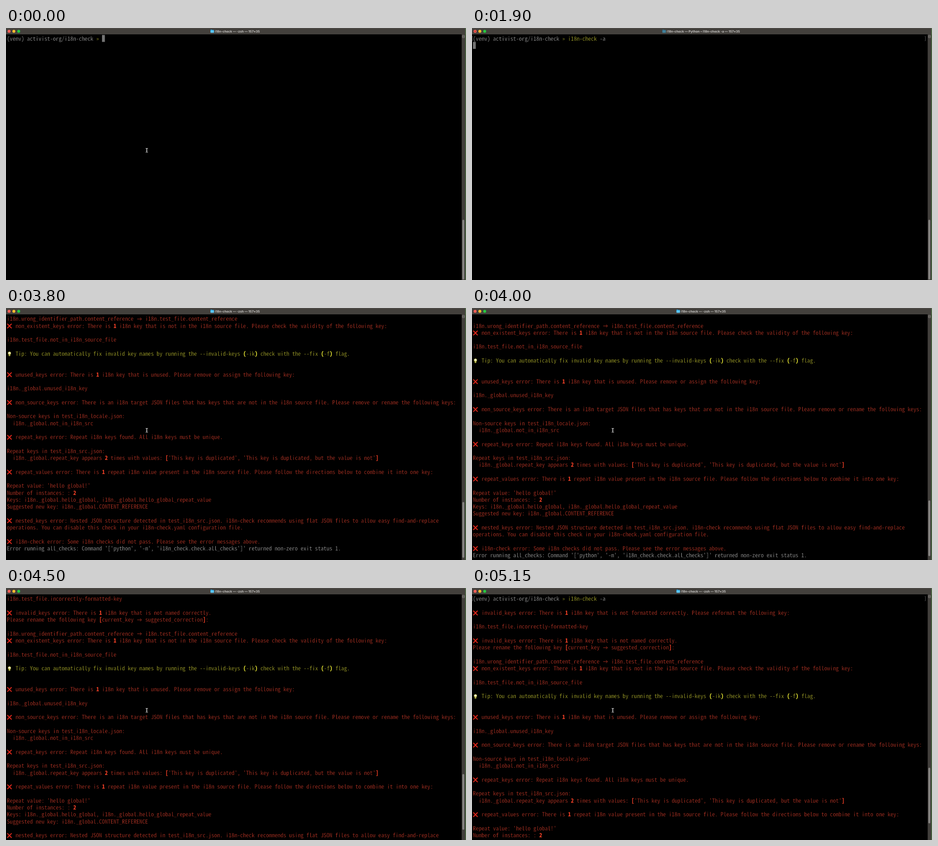
An HTML page for the animation above (5.31 s loop, 1011 px wide and 554 px high).

```html
<!DOCTYPE html>
<html lang="en">
<head>
<meta charset="utf-8">
<title>Terminal</title>
<style>
  html, body { margin: 0; width: 100%; height: 100%; overflow: hidden; background: #000; }
  svg { display: block; width: 1011px; height: 554px; }
  text { white-space: pre; text-rendering: geometricPrecision; font-variant-ligatures: none; }
  #screen text { font-family: "Noto Sans Mono CJK JP", "Noto Sans Mono CJK SC", "Noto Sans Mono", monospace; }
  #title text { font-family: Inter, sans-serif; font-weight: 700; fill: #c9c7c5; }
  .grey { fill: #a6a6a6; stroke: #a6a6a6; }
  .red { fill: #bd3727; stroke: #bd3727; }
  .yellow { fill: #b0b02d; stroke: #b0b02d; }
  .bold { font-weight: 700; }
  .red .bold { fill: #ff4328; }
  .yellow .bold { fill: #eeee35; }
  /* A black outline thins the regular weight. */
  #screen text { stroke: #000; stroke-width: 0.25px; }
  #screen .bold { stroke: none; }
</style>
</head>
<body>
<svg viewBox="0 0 1011 554">
  <rect width="1011" height="554"/>
  <rect width="1010" height="14" fill="#43403c"/>
  <rect width="1010" height="0.7" fill="#5b5854"/>
  <circle cx="6.8" cy="7.2" r="3.2" fill="#ff5f57"/>
  <circle id="busy" cx="6.8" cy="7.2" r="1.1" fill="#7d1510"/>
  <circle cx="17.3" cy="7.2" r="3.2" fill="#febc2e"/>
  <circle cx="27.9" cy="7.2" r="3.2" fill="#28c840"/>
  <g id="title"></g>
  <rect x="1001.5" y="14" width="8" height="540" fill="#423f3c"/>
  <path d="M1003.2 16.2h4.4v5h-4.4zM1003.2 18.7h4.4" fill="none" stroke="#96938f" stroke-width="0.8"/>
  <rect id="thumb" x="1003" width="4.2" rx="2.1" fill="#868482"/>
  <rect x="1009.5" width="1.5" height="554" fill="#55784a"/>
  <g id="screen"></g>
  <g id="pointer" fill="none">
    <defs><path id="beam" d="M307 264.6q2.4 0 2.4 1.6v5.4q0 1.6-2.4 1.6M311.8 264.6q-2.4 0-2.4 1.6v5.4q0 1.6 2.4 1.6M308 269h2.8"/></defs>
    <use href="#beam" stroke="#111" stroke-width="2.4"/>
    <use href="#beam" stroke="#d6d6d6" stroke-width="1.1"/>
  </g>
</svg>
<script>
const LOOP = 5310, LEFT = 2, TOP = 15.5, COL = 6.333, ROW = 15.29, ROWS = 35, BASELINE = 12.8;
const PROMPT = '(venv) activist-org/i18n-check ~»~ ';
const PROMPT_COLS = 33;
const TITLE_IDLE = 'i18n-check — -zsh — 157×35';
const TITLE_BUSY = 'i18n-check — Python • i18n-check -a — 157×35';

// Markup: leading x = cross, leading ? = bulb, *bold*, ~yellow~, ^red^
const OUTPUT = `
xinvalid_keys error: There is *1* i18n key that is not formatted correctly. Please reformat the following key:

i18n.test_file.incorrectly-formatted-key

xinvalid_keys error: There is *1* i18n key that is not named correctly.
Please rename the following key *[*current_key → suggested_correction*]*:

i18n.wrong_identifier_path.content_reference → i18n.test_file.content_reference
xnon_existent_keys error: There is *1* i18n key that is not in the i18n source file. Please check the validity of the following key:

i18n.test_file.not_in_i18n_source_file

?Tip: You can automatically fix invalid key names by running the --invalid-keys *(*-ik*)* check with the --fix *(*-f*)* flag.


xunused_keys error: There is *1* i18n key that is unused. Please remove or assign the following key:

i18n._global.unused_i18n_key

xnon_source_keys error: There is an i18n target JSON files that has keys that are not in the i18n source file. Please remove or rename the following keys:

Non-source keys in test_i18n_locale.json:
  i18n._global.not_in_i18n_src

xrepeat_keys error: Repeat i18n keys found. All i18n keys must be unique.

Repeat keys in test_i18n_src.json:
  i18n._global.repeat_key appears *2* times with values: *[*'This key is duplicated', 'This key is duplicated, but the value is not'*]*

xrepeat_values error: There is *1* repeat i18n value present in the i18n source file. Please follow the directions below to combine it into one key:

Repeat value: 'hello global!'
Number of instances: : *2*
Keys: i18n._global.hello_global, i18n._global.hello_global_repeat_value
Suggested new key: i18n._global.CONTENT_REFERENCE

xnested_keys error: Nested JSON structure detected in test_i18n_src.json. i18n-check recommends using flat JSON files to allow easy find-and-replace
operations. You can disable this check in your i18n-check.yaml configuration file.

xi18n-check error: Some i18n checks did not pass. Please see the error messages above.
Error running all_checks: Command '['python', '-m', 'i18n_check.check.all_checks']' returned non-zero exit status 1.
`.split('\n');

// [time, value] steps
const TYPED = [[0, ''], [200, '^i^'], [300, '^i1^'], [500, '^i18^'], [600, '^i18n^'], [800, '~i18n-check~ -a']];
const SCROLL = [[0, 0], [2200, 10], [3800, 9], [4000, 8], [4100, 7], [4300, 6], [4400, 5],
  [4500, 4], [4800, 3], [4900, 2], [5000, 1], [5150, 0]];

const byId = id => document.getElementById(id);
const stepAt = (steps, t) => steps.filter(([start]) => start <= t).pop()[1];
const escapeText = s => s.replace(/&/g, '&amp;').replace(/</g, '&lt;');
const show = (id, on) => byId(id).setAttribute('visibility', on ? 'visible' : 'hidden');

function fitSize(font, weight, sample, width) {
  const ctx = document.createElement('canvas').getContext('2d');
  ctx.font = `${weight} 100px ${font}`;
  return 100 * width / ctx.measureText(sample).width;
}
const MONO = '"Noto Sans Mono CJK JP", "Noto Sans Mono CJK SC", "Noto Sans Mono", monospace';
const monoSize = fitSize(MONO, 400, 'n'.repeat(50), 50 * COL);
const titleSize = fitSize('Inter, sans-serif', 700, TITLE_IDLE, 99);

const columnX = col => LEFT + col * COL;
const rowY = row => TOP + row * ROW;

function cross(y) {
  return `<path d="M3.4 ${y + 4.5}l8.4 8.6m0 -8.6l-8.4 8.6" stroke="#e3281c" stroke-width="2.1" stroke-linecap="round"/>`;
}

function bulb(y) {
  return `<circle cx="7.6" cy="${y + 7.3}" r="3" fill="#fbf6dc"/>
    <path d="M6 ${y + 9.1}h3.2v2h-3.2z" fill="#f1e6b8"/>
    <path d="M6.2 ${y + 11.1}h2.8v2.2h-2.8z" fill="#8f9399"/>`;
}

function arrow(col, y) {
  const x = columnX(col) + 1.3;
  return `<path d="M${x} ${y + 8.7}h9.6m-3.4 -3.2l3.4 3.2l-3.4 3.2" fill="none" stroke-width="0.9"/>`;
}

function textRow(source, row, tone) {
  const y = rowY(row), classes = { '*': 'bold', '~': 'yellow', '^': 'red' };
  let col = 0, out = '';
  if (/^[x?]/.test(source)) {
    out += source[0] === 'x' ? cross(y) : bulb(y);
    if (source[0] === '?') tone = 'yellow';
    source = source.slice(1);
    col = 3;
  }
  for (const part of source.split(/(\*[^*]+\*|~[^~]+~|\^[^^]+\^|→)/)) {
    if (!part) continue;
    if (part === '→') {
      out += arrow(col, y);
      col += 2;
      continue;
    }
    const cls = classes[part[0]];
    const body = cls ? part.slice(1, -1) : part;
    out += `<text class="${cls || ''}" x="${columnX(col)}" y="${y + BASELINE}">${escapeText(body)}</text>`;
    col += body.length;
  }
  return `<g class="${tone}">${out}</g>`;
}

function cursor(col, row) {
  return `<rect x="${columnX(col)}" y="${rowY(row) - 0.2}" width="${COL}" height="${ROW}" fill="#747474"/>`;
}

function marks(row) {
  const y = rowY(row) + 3;
  return `<path d="M2 ${y}h-1.3v9.5h1.3M995.2 ${y}h1.3v9.5h-1.3" fill="none" stroke="#666" stroke-width="0.8"/>`;
}

function titleMarkup(busy, dim) {
  const x = busy ? 428 : 459, fill = dim ? '#35718c' : '#2fa9e4', front = dim ? '#42819b' : '#5cc8f5';
  return `<path d="M${x - 9.5} 4q0 -.6 .6 -.6h2.2l.8 .8h3.4q.6 0 .6 .6v5h-7.6z" fill="${fill}"/>
    <rect x="${x - 9.5}" y="5.4" width="7.6" height="5" rx=".6" fill="${front}"/>
    <text x="${x}" y="9.7" font-size="${titleSize}">${busy ? TITLE_BUSY : TITLE_IDLE}</text>`;
}

function screenMarkup(t) {
  const typed = stepAt(TYPED, t), offset = stepAt(SCROLL, t);
  const entered = t >= 1500, printed = t >= 2200;
  const lines = [PROMPT + typed];
  if (printed) lines.push(...OUTPUT, PROMPT);

  let out = '';
  lines.slice(offset, offset + ROWS).forEach((line, row) => {
    const index = row + offset;
    const plain = index === 0 || index >= lines.length - 3;
    out += textRow(line, row, plain ? 'grey' : 'red');
  });
  if (entered && offset === 0) out += marks(0);

  const typedCols = typed.replace(/[~^]/g, '').length;
  if (!entered) out += cursor(PROMPT_COLS + typedCols, 0);
  else if (!printed) out += cursor(0, 1);
  else if (offset === 10) out += cursor(PROMPT_COLS, ROWS - 1);
  return out;
}

const CHANGES = [...new Set([...TYPED, ...SCROLL].map(([t]) => t).concat(1500, 1900, 2300, 3200))].sort((a, b) => a - b);
let drawn = -1;

function render(t) {
  const state = CHANGES.filter(c => c <= t).pop();
  if (state === drawn) return;
  drawn = state;
  byId('screen').innerHTML = screenMarkup(t);
  byId('title').innerHTML = titleMarkup(t >= 1900 && t < 2300, t >= 1500 && t < 2300);
  show('busy', t >= 500 && t < 2300);
  show('pointer', t < 200 || t >= 3200);
  const printed = t >= 2200;
  byId('thumb').setAttribute('y', printed ? 395 + 3.5 * stepAt(SCROLL, t) : 421.5);
  byId('thumb').setAttribute('height', printed ? 122.5 : 131.5);
}

byId('screen').setAttribute('font-size', monoSize);
const began = performance.now();
function tick() {
  render((performance.now() - began) % LOOP);
  requestAnimationFrame(tick);
}
tick();
</script>
</body>
</html>
```
